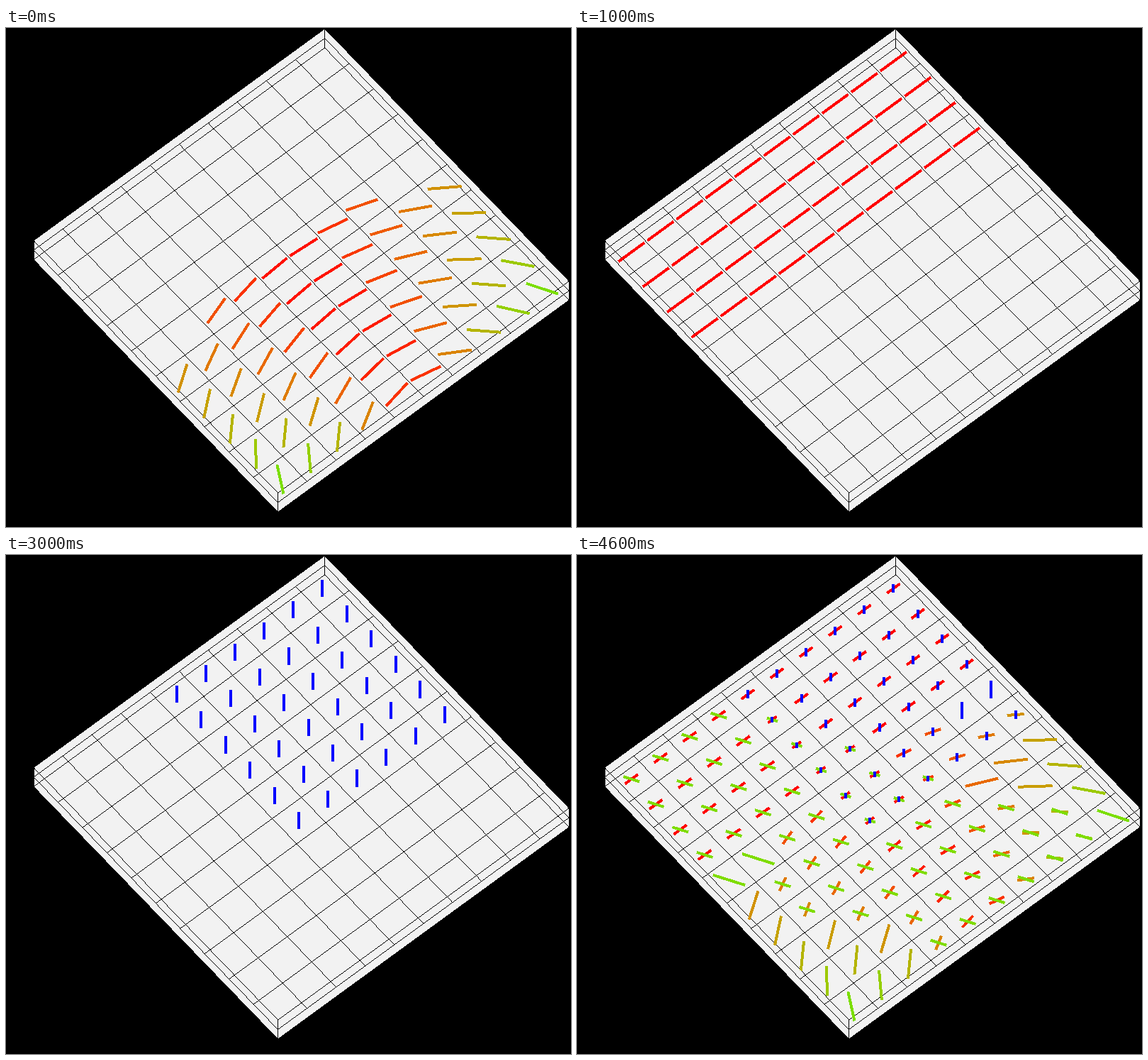
Animation of 797 by 703 pixels, one loop 5 s. Source, as a matplotlib script:

```python
import numpy as np
import matplotlib.pyplot as plt
from matplotlib.animation import FuncAnimation
from matplotlib.path import Path

W, H, DPI = 797, 703, 100
N = 10              # voxels per side
SCALE = 53.6        # pixels per voxel edge
AZ, EL = np.radians([40, 60])
CENTER = np.array([416.6, 341.5])
BAR = 0.9           # bar length in voxels
BAR_WIDTH = 4


def project(p):
    """Orthographic view of (x, y, z) points, in pixels from the top left."""
    x, y, z = np.moveaxis(np.asarray(p, float) - [N / 2, N / 2, 0.5], -1, 0)
    px = -np.cos(AZ) * x + np.sin(AZ) * y
    py = np.sin(EL) * (np.sin(AZ) * x + np.cos(AZ) * y) - np.cos(EL) * z
    return CENTER + SCALE * np.stack([px, py], -1)


def stroke(img, p, q, color, width=None):
    """Hard-edged line over the pixels whose centres it covers.

    Without a width it is a hairline, one pixel per row or column."""
    d = q - p
    length = np.hypot(*d)
    d = d / length
    if width is None:
        width = np.abs(d).max()
    x0, y0 = np.maximum(np.minimum(p, q).astype(int) - 3, 0)
    x1, y1 = np.maximum(p, q).astype(int) + 4
    box = img[y0:y1, x0:x1]
    y, x = np.mgrid[y0:y0 + box.shape[0], x0:x0 + box.shape[1]] + 0.5
    along = (x - p[0]) * d[0] + (y - p[1]) * d[1]
    across = (x - p[0]) * d[1] - (y - p[1]) * d[0]
    box[(along >= 0) & (along <= length) & (np.abs(across) <= width / 2)] = color


def bundle_arc(i, j):
    dx, dy = i - 4.5, j - 11.5
    r = np.hypot(dx, dy)
    return (-dy / r, dx / r, 0) if r <= 8 else None


def bundle_x(i, j):
    return (1, 0, 0) if j < 4 else None


def bundle_slant(i, j):
    a = np.radians(60)
    near = abs(i - 8.53 + j / np.tan(a)) <= 3.01
    return (-np.cos(a), np.sin(a), 0) if near else None


def bundle_z(i, j):
    return (0, 0, 1) if i < 6 and j < 6 else None


BUNDLES = [bundle_arc, bundle_x, bundle_slant, bundle_z]


def wireframe():
    lines = []
    for k in range(N + 1):
        lines += [[(k, 0, 0.5), (k, N, 0.5)], [(0, k, 0.5), (N, k, 0.5)]]
    for a in (0, N):
        for z in (0, 1):
            lines += [[(a, 0, z), (a, N, z)], [(0, a, z), (N, a, z)]]
        for b in (0, N):
            lines.append([(a, b, 0), (a, b, 1)])
    return project(lines)


def slab():
    outline = project([(0, 0, 1), (0, N, 1), (0, N, 0), (N, N, 0), (N, 0, 0), (N, 0, 1)])
    y, x = np.mgrid[:H, :W] + 0.5
    inside = Path(outline).contains_points(np.c_[x.ravel(), y.ravel()])
    img = np.zeros((H, W, 3))
    img[inside.reshape(H, W)] = 0.95
    for p, q in wireframe():
        stroke(img, p, q, 0)
    return img


def view(base, bundles):
    """Bars for each voxel, its length shared among the bundles crossing it."""
    img = base.copy()
    for j in range(N):
        for i in range(N):
            dirs = [d for d in (b(i, j) for b in bundles) if d is not None]
            mid = np.array([i + 0.5, j + 0.5, 0.5])
            for d in np.array(dirs):
                half = d * BAR / 2 / len(dirs)
                p, q = project([mid - half, mid + half])
                stroke(img, p, q, np.abs(d).clip(0, 1), BAR_WIDTH)
    return img


base = slab()
VIEWS = [view(base, [b]) for b in BUNDLES] + [view(base, BUNDLES)]

fig = plt.figure(figsize=(W / DPI, H / DPI), dpi=DPI, facecolor="black")
ax = fig.add_axes([0, 0, 1, 1])
ax.axis("off")
picture = ax.imshow(VIEWS[0], interpolation="nearest", aspect="auto")


def update(n):
    picture.set_data(VIEWS[n])
    return [picture]


anim = FuncAnimation(fig, update, frames=len(VIEWS), interval=1000, repeat=True,
                     repeat_delay=0, init_func=lambda: update(0))
plt.show()
```
